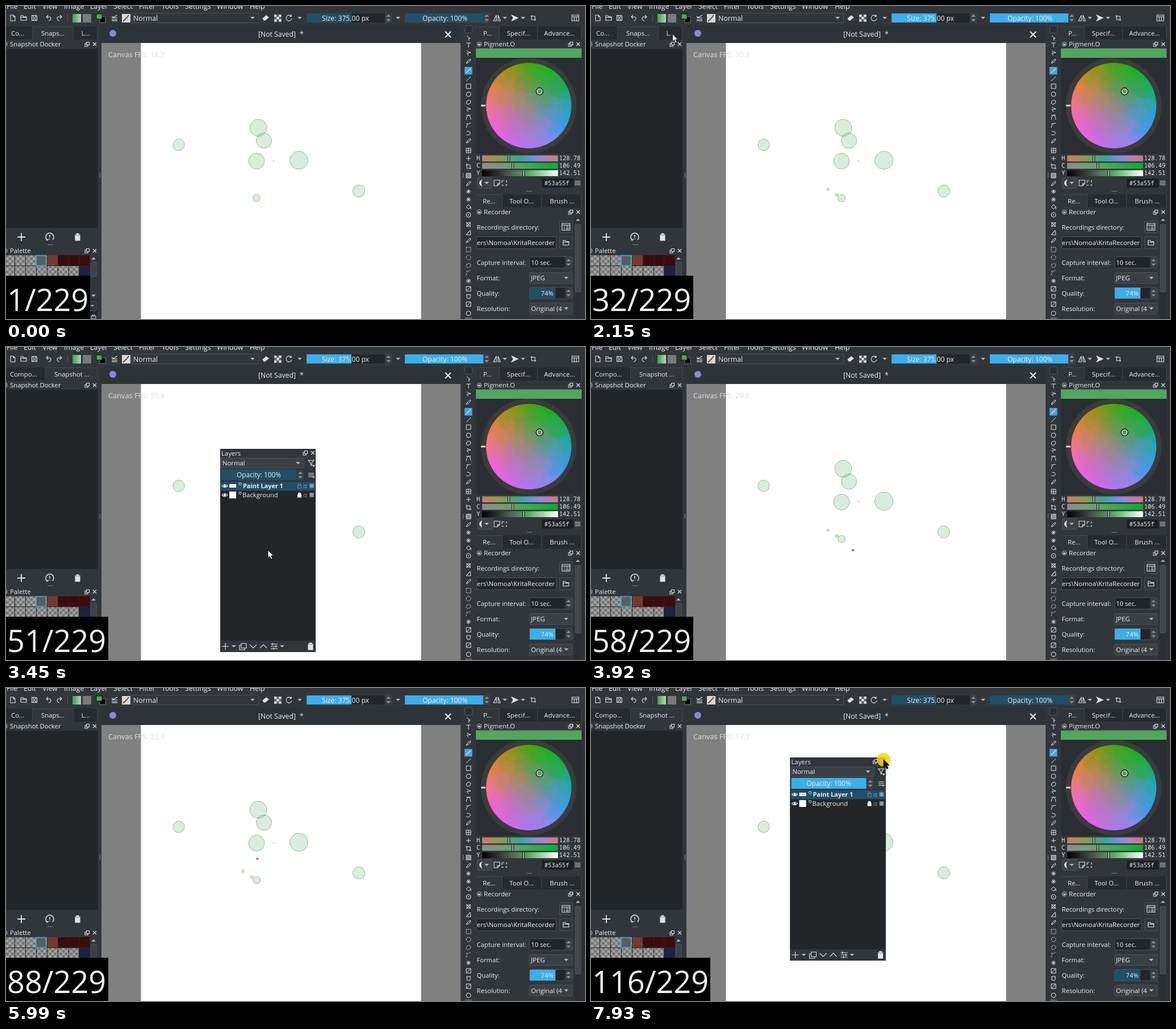
Recreate the animation shown at these times as an HTML page. Size 1019x550 px, loop 8 s.

```html
<!DOCTYPE html>
<html lang="en">
<head>
<meta charset="utf-8">
<title>Layers docker popup</title>
<style>
html, body { margin: 0; width: 100%; height: 100%; overflow: hidden; background: #31363b; }
svg { display: block; position: absolute; left: 0; top: 0; --main: #224e66; --panel: #224e66; }
text { font-family: "Open Sans", "Noto Sans", sans-serif; fill: #eff0f1; white-space: pre; }
.mono { font-family: "Noto Sans Mono", "DejaVu Sans Mono", monospace; }
.i { fill: none; stroke: #e3e5e7; stroke-width: 1.1; }
</style>
</head>
<body>
<svg id="stage" width="1019" height="550" viewBox="0 0 1019 550"></svg>
<script>
const FRAME = 68.75, LOOP = 8000, LAST = 115;
const BG = '#31363b', DARK = '#232629', EDGE = '#4d5257', ON = '#3daee9', OFF = '#224e66';

const rect = (x, y, w, h, fill, extra = '') => `<rect x="${x}" y="${y}" width="${w}" height="${h}" fill="${fill}" ${extra}/>`;
const box = (x, y, w, h, fill = BG) => rect(x + .5, y + .5, w - 1, h - 1, fill, `stroke="${EDGE}" rx="1.5"`);
const text = (x, y, s, size = 11.2, extra = '') => `<text x="${x}" y="${y}" font-size="${size}" ${extra}>${s}</text>`;
const mid = 'text-anchor="middle"';
const circ = (x, y, r, fill, extra = '') => `<circle cx="${x}" cy="${y}" r="${r}" fill="${fill}" ${extra}/>`;
const icon = (x, y, d, extra = '') => `<path class="i" transform="translate(${x} ${y})" d="${d}" ${extra}/>`;
const tri = (x, y, s = 4, c = '#b4b8bb') => `<path d="M${x - Math.abs(s)} ${y - s / 2}h${2 * Math.abs(s)}l${-Math.abs(s)} ${s}z" fill="${c}"/>`;
const spin = (x, y) => rect(x - 6, y - 9, 12, 18, '#3a4045') + tri(x, y - 4, -4, '#8d9296') + tri(x, y + 4, 4, '#8d9296');

const G = {
  plus: 'M-6 0H6M0-6V6',
  cross: 'M-3-3L3 3M3-3L-3 3',
  float: 'M-1.5-3.5H3.5V1.5H-1.5ZM-1.5-1H-4V4H1V1.5',
  trash: 'M-5-4H5M-2-4V-6H2V-4M-4-3V6H4V-3M-1.3-1V4M1.3-1V4',
  page: 'M-3.5-5H1L4-2V5H-4V-5ZM1-5V-2H4',
  folder: 'M-5-4H-1L0-2H5V4H-5ZM-5-1H5',
  save: 'M-4.5-4.5H3L4.5-3V4.5H-4.5ZM-2-4.5V-1H2V-4.5M-2 4.5V1.5H2V4.5',
  undo: 'M-1-5L-4-2L-1 1M-4-2H1Q4-2 4 1T0 5',
  redo: 'M1-5L4-2L1 1M4-2H-1Q-4-2-4 1T0 5',
  lines: 'M-5-3H5M-5 0H5M-5 3H5',
  reload: 'M4-3A5 5 0 1 0 5 1M4-6V-2.5H1',
  copy: 'M-3-5H6V3H-3ZM-3-2H-6V6H3V3',
  down: 'M-6-3L0 3L6-3', up: 'M-6 3L0-3L6 3',
  mixer: 'M-6-4H6M-6 0H6M-6 4H6M-3-6V-2M3-2V2M-1 2V6',
  funnel: 'M-5-5H5L1 0V4L-1 3V0ZM3 4L6 4L4.5 6Z',
  eye: 'M-5 0Q0-5 5 0Q0 5-5 0Z',
  lock: 'M-3-1H3V4H-3ZM-2-1V-3Q0-5 2-3V-1',
  sq: 'M-4-4H4V4H-4Z', ring: 'M-4 0A4 4 0 1 1 4 0A4 4 0 1 1-4 0',
  poly: 'M-3-2L1-4L4-2L3 2L-1 4L-4 2Z', pen: 'M-4 4L-2 0L3-4L4-2L0 2Z',
  curve: 'M-4 4Q-3-4 4-4M-4-3H0', tee: 'M-4-4H4M0-4V4', slash: 'M-4 4L4-4',
  angle: 'M-3-4L4-1L-3 0L0 4', frame: 'M-3-5V3H5M-5-3H3V5', star: 'M0-4V4M-4 0H4M-3-3L3 3M3-3L-3 3'
};
const SOLID = 'style="fill:#dfe1e3"';
const dockButtons = (x, y) => icon(x, y, G.float) + icon(x + 13, y, G.cross);
const chain = (x, y) => circ(x, y, 3.8, 'none', 'stroke="#bcc0c3"') + rect(x - 2, y - 1, 4, 3, '#bcc0c3');

let seed = 7;
const rnd = () => (seed = (seed * 16807) % 2147483647) / 2147483647;

// Rim colours every 30 degrees, clockwise from the top
const HUES = ['45a60f', '12b41c', '10ae5c', '1ca8c4', '389cf2', '8e86fa', 'b474f6', 'e062f2', 'f860dc', 'f8748c', 'e4823a', '9c9210']
  .map(h => [0, 2, 4].map(k => parseInt(h.substr(k, 2), 16)));
const mix = (a, b, f) => a.map((v, k) => v + (b[k] - v) * f);
function wheelColor(deg, f) {
  const p = ((deg + 360) % 360) / 30, k = Math.floor(p);
  const c = mix(HUES[k], HUES[(k + 1) % 12], p - k);
  return `rgb(${mix([143, 140, 132], c, f).map(Math.round)})`;
}
function wheel(cx, cy, R) {
  const at = (d, r) => {
    const a = d * Math.PI / 180;
    return [(cx + r * Math.sin(a)).toFixed(1), (cy - r * Math.cos(a)).toFixed(1)];
  };
  let s = circ(cx, cy, 84, '#3b3b3b');
  for (let d = 0; d < 360; d += 3)
    s += `<path d="M${cx} ${cy}L${at(d - .4, R)}L${at(d + 3.4, R)}Z" fill="${wheelColor(d, 1)}"/>`;
  s += circ(cx, cy, R, 'url(#grey)');
  for (let k = 0; k < 150; k++) {
    const d = rnd() * 360, r = R * .84 * Math.sqrt(rnd()), w = 5 + rnd() * 9, p = at(d, r).map(Number);
    const pts = [0, 1, 2, 3, 4].map(j => {
      const a = j * 1.257 + rnd();
      return `${(p[0] + w * Math.cos(a)).toFixed(1)},${(p[1] + w * Math.sin(a)).toFixed(1)}`;
    });
    s += `<polygon points="${pts.join(' ')}" fill="${wheelColor(d + rnd() * 24 - 12, r / R)}" opacity=".5"/>`;
  }
  return s + circ(939, 150, 5.5, 'none', 'stroke="#111" stroke-width="2.4"') +
    circ(939, 150, 4.6, 'none', 'stroke="#fff" stroke-width="1.3"') + rect(836, 173.5, 8, 3, '#d5d5d5');
}

const grad = (id, cols) => `<linearGradient id="${id}">${cols.map((c, k) =>
  `<stop offset="${k / (cols.length - 1)}" stop-color="${c}"/>`).join('')}</linearGradient>`;
const defs = `<defs>
${grad('gh', ['#c0806f', '#b0895a', '#8a9c52', '#53a56a', '#3fa39a', '#5d98cc', '#9688dc', '#c07ab4', '#c87a7c'])}
${grad('gc', ['#8c8c8c', '#7d987f', '#53a55f', '#2aac48', '#00b22c'])}
${grad('gy', ['#000', '#2b2f2c', '#53685a', '#53a55f', '#a4d8ab', '#fff'])}
${grad('gs', ['#3f9a4d', '#b8d8bb'])}
<radialGradient id="grey"><stop offset="0" stop-color="#8f8c84"/><stop offset="1" stop-color="#8f8c84" stop-opacity="0"/></radialGradient>
<pattern id="chk" width="9.4" height="9.3" patternUnits="userSpaceOnUse">
${rect(0, 0, 9.4, 9.3, '#a3a3a3') + rect(0, 0, 4.7, 4.65, '#727272') + rect(4.7, 4.65, 4.7, 4.65, '#727272')}</pattern>
<clipPath id="path"><rect x="829" y="405" width="138" height="22"/></clipPath></defs>`;

function tabs(list, y, h) {
  return list.map(([x, w, s, active, tx]) =>
    rect(x, y, w, h, active ? BG : '#272b2f') + rect(x + w - 1, y, 1, h, '#41464b') +
    (active ? rect(x, y, w, 1, '#454a4f') : '') + text(tx, y + 16, s, 11.4)).join('');
}

function toolbar() {
  const menu = [[1, 'File'], [31, 'Edit'], [64, 'View'], [102, 'Image'], [148, 'Layer'], [189, 'Select'],
    [234, 'Filter'], [274, 'Tools'], [315, 'Settings'], [371, 'Window'], [429, 'Help']];
  const squares = [0, 1, 2, 3, 4, 5, 6, 7, 8].filter(k => k % 2 < 1)
    .map(k => rect(472 + (k % 3) * 4.2, 15 + Math.floor(k / 3) * 4.2, 4.2, 4.2, '#e6e8ea')).join('');
  return menu.map(([x, s]) => text(x, 4.5, s, 12.3)).join('') +
    icon(12, 21, G.page) + icon(31, 21, G.folder) + icon(50, 21, G.save) + icon(75, 21, G.undo) + icon(94, 21, G.redo) +
    rect(108, 15, 1, 13, '#555a5f') + rect(117, 14, 15, 15, 'url(#gs)') + rect(135, 14, 15, 15, '#7a7a7a') +
    rect(165, 19, 10, 10, '#000', 'stroke="#777"') + rect(159, 14, 10, 9, '#53a55f', 'stroke="#111"') +
    icon(191, 21, 'M-5-3L-2-1L5-5M-5 0H5M-5 3H5M-5 5H5') + rect(204, 14, 15, 15, '#d9d9d9') +
    icon(211, 21, 'M-5 6L1 0L5-5', 'style="stroke:#665040;stroke-width:2"') +
    box(221, 12, 224, 18) + text(224, 25.5, 'Normal', 12.3) + tri(434, 21) +
    icon(457, 21, 'M-5 1L1-4L5-1L-1 4H-3Z', SOLID) + rect(472, 15, 12.6, 12.6, '#5a5f63') + squares +
    icon(498, 21, G.reload) + tri(517, 21) +
    rect(529, 13, 138, 16, DARK) + rect(529, 13, 79, 16, 'var(--main)') +
    text(556, 25.5, 'Size: 375.00 px', 12.1) + spin(673, 21) + tri(690, 21) +
    rect(702, 13, 138, 16, 'var(--main)') + text(733, 25.5, 'Opacity: 100%', 12) + spin(846, 21) +
    icon(864, 21, 'M-1-5V5H-6ZM2-5V5H6Z') + tri(878, 21) + icon(895, 21, 'M-5-5L6 0L-5 5L-2 0Z', SOLID) + tri(910, 21) +
    icon(928, 21, G.frame) + icon(1002, 21, 'M-6-5H6V5H-6ZM-6-2H6M2-2V5M-2-2V5');
}

function leftDock() {
  let s = rect(0, 34, 168, 516, BG) + '<g id="tabs"></g>' +
    circ(-2, 67, 4, 'none', 'stroke="#bcc0c3"') + text(7, 71, 'Snapshot Docker', 11.3) + dockButtons(143, 67) +
    rect(0, 75, 161, 315, DARK) +
    icon(27, 406, 'M-7 0H7M0-7V7', 'style="stroke-width:1.8"') + icon(126, 406, G.trash, SOLID) +
    icon(77, 406, 'M-5 5A7 7 0 1 1 5 5M-7 2L-5 5.5L-2 4M0-4V1M0 3V4', 'style="stroke-width:1.5"') +
    rect(73, 419, 10, 1, '#777c80') + circ(-2, 430, 4, 'none', 'stroke="#bcc0c3"') + text(7, 434, 'Palette', 11.3) + dockButtons(143, 430) +
    rect(0, 438, 161, 112, DARK) + rect(0, 438, 72, 37, 'url(#chk)') + rect(72, 456, 56, 19, 'url(#chk)') +
    rect(72, 438, 19, 18, '#733a30') + rect(91, 438, 56, 18, '#3b0b0d') + rect(128, 457, 19, 18, '#1d2141') +
    [15, 34, 53, 72, 91, 110, 128].map(x => rect(x, 438, 1, 37, '#26292c')).join('') + rect(0, 456, 147, 1, '#26292c') +
    rect(53, 438.5, 17.5, 17.5, '#5c5c5a', `stroke="${ON}" stroke-width="1.6"`);
  return s + rect(148, 438, 13, 78, BG) + box(149, 450, 11, 26, '#3b4146') + tri(154, 443.5, -4) + tri(154, 509, 4) +
    box(140, 518, 20, 18) + tri(152, 527, 3) + icon(154, 549, G.trash) + rect(165, 293, 1, 9, '#80858a');
}

function canvasView() {
  const dots = [[441, 337.5, 6.5], [444, 214, 15], [454, 236.5, 13.5], [441, 272.5, 14], [515.5, 271, 16], [304, 244, 10.2], [621, 325, 10.7]];
  const dab = (x, y, r) => circ(x, y, r, '#53a55f', 'fill-opacity=".21" stroke="#3f8f4c" stroke-opacity=".5"');
  return rect(168, 34, 632, 31, '#2e3338') + circ(188, 48, 6, '#8d86d6') + text(444, 53.5, '[Not Saved]', 12.2) + text(517, 53.5, '*', 12.2) +
    icon(778, 50, 'M-5-5L5 5M5-5L-5 5', 'style="stroke-width:2.2"') +
    rect(168, 65, 632, 485, '#808080') + rect(237.5, 65, 493, 485, '#fff') +
    circ(417, 322, 3, '#c9e0cc', 'id="dabA"') + circ(432.5, 332, 3.5, '#c9e0cc', 'id="dabB"') +
    dots.map(d => dab(...d)).join('') + circ(471, 272, 1.8, '#d6dbd6') +
    text(180, 89.5, '', 12.8, 'id="fps" style="fill:#dedede"');
}

function toolbox() {
  const list = [[56, 'M-3-4L3 1L0 1L1 5'], [69, G.tee], [83, G.angle], [97, G.pen], [128, G.slash], [141, G.sq], [155, G.ring], [169, G.poly],
    [182, G.angle], [196, 'M-4 4Q-3-4 0-4T4 4M-4-4H4'], [210, G.curve], [223, 'M-3-3Q4-3 3 1T-4 3'], [237, G.pen], [254, 'M-4-4H4V4H-4ZM0-4V4M-4 0H4'],
    [268, G.plus.replace(/6/g, '4')], [282, G.frame], [312, G.pen], [326, G.star], [340, G.star], [353, 'M-4 0L0-4L4 0L0 4ZM4 0V4'],
    [367, G.ring + 'M-1 0H1M0-1V1'], [384, 'M-4-4L4 4M4-4L-4 4M-3-3H3V3H-3Z'], [398, 'M-4 4H4L3-4ZM-4 4L3-4'], [412, G.pen],
    [428, G.sq], [442, G.ring], [456, G.poly], [469, G.curve], [483, G.star], [497, G.sq + G.slash], [510, 'M-4-3H4M-3-3V3Q0 5 3 3V-3'], [524, G.sq + G.slash], [540, G.ring]];
  return rect(800, 34, 27, 516, BG) + box(807, 34, 14, 14, '#2a2e32') + rect(807, 107, 13.5, 13.5, '#4aa3dc') + icon(814, 113.5, 'M-4 4L-1 1L4-4') +
    list.map(([y, d], k) => icon(814, y, d, `style="stroke-width:1" ${k > 23 && k < 28 ? 'stroke-dasharray="2 1.3"' : ''}`)).join('') +
    rect(810, 294, 8, 8, '#8b8b8b', 'stroke="#ddd"') + rect(804, 293, 1, 9, '#80858a') + rect(808, 547, 12, 3, '#5a5f64');
}

function rightDock() {
  const bars = [['H', 262.5, 'gh', 885, '128.78'], ['C', 275.5, 'gc', 892, '106.49'], ['Y', 288.5, 'gy', 911, '142.51']];
  const label = (y, s) => text(828.5, y, s, 11.2);
  const combo = (y, s) => box(921, y, 76, 20, '#3a4045') + text(924, y + 14, s, 11.4) + tri(986, y + 10);
  return rect(827, 34, 192, 516, BG) +
    tabs([[828, 41, 'P...', 1, 840], [869, 67, 'Specif...', 0, 881.5], [936, 77, 'Advance...', 0, 947]], 36, 23) +
    chain(833, 67) + text(841, 71, 'Pigment.O', 11.3) + dockButtons(994, 67) +
    rect(827, 75, 186, 185, '#2a2e32') + rect(827, 74.5, 186, 16.5, '#53a55f') + wheel(920, 175, 75) +
    bars.map(([n, y, id, m, v]) => text(828, y + 8.7, n, 10.4, 'class="mono"') + rect(838, y, 133.5, 10.5, `url(#${id})`) +
      rect(m - 2, y, 4, 10.5, '#111') + rect(m - .7, y, 1.4, 10.5, '#fff') + text(973.5, y + 8.7, v, 10.4, 'class="mono"')).join('') +
    box(829, 301, 27, 20, '#3d4247') + icon(836, 311, 'M1-5Q-6 0 1 5Q-1 0 1-5Z', SOLID) + tri(846, 311) +
    icon(864, 311, 'M-5-5H5V1L1 5H-5ZM5 1H1V5') + icon(877, 311, G.sq, 'stroke-dasharray="4 3"') +
    rect(943, 303, 56, 16, '#1d2023') + text(947.5, 314.5, '#53a55f', 10.4, 'class="mono"') + icon(1006, 311, G.lines) + rect(916, 325, 10, 1, '#777c80') +
    tabs([[828, 46, 'Re...', 1, 839], [874, 69, 'Tool O...', 0, 886], [943, 70, 'Brush ...', 0, 957]], 331, 23) +
    chain(833, 362) + text(841, 366, 'Recorder', 11.3) + dockButtons(994, 362) +
    label(393, 'Recordings directory:') + box(974, 377, 23, 22) + icon(985.5, 388, 'M-7-6H7V6H-7ZM-7-3H7M-4-1H-2M-4 2H-2M-4 4H-2M0-1H5M0 2H5M0 4H5') +
    box(828, 405, 141, 22, DARK) + `<g clip-path="url(#path)">${text(966, 420, 'Users\\Nomoa\\KritaRecorder', 11.4, 'text-anchor="end"')}</g>` +
    box(974, 405, 23, 22) + icon(985.5, 416, G.folder) +
    label(455, 'Capture interval:') + box(921, 440, 76, 21, DARK) + text(924, 455, '10 sec.', 11.2) + spin(990, 450.5) +
    label(482, 'Format:') + combo(468, 'JPEG') +
    label(509, 'Quality:') + box(921, 494, 76, 21, DARK) + rect(922, 495, 45, 19, 'var(--main)') + text(952.5, 509, '74%', 11.4, mid) + spin(990, 504.5) +
    label(536, 'Resolution:') + combo(521.5, 'Original (4') +
    rect(1000, 370, 13, 180, '#2b2f33') + tri(1006.5, 375.5, -4) + box(1001, 383, 11, 120, '#42474c') +
    rect(1014, 58, 5, 492, '#2b3034');
}

function layersPanel() {
  const row = (y, s, bold, x) => icon(8, y, G.eye) + circ(8, y, 2, '#fff') +
    (bold ? rect(16, y - 3, 12, 6, '#fff') + [17, 21, 25].map(k => rect(k, y - 1, 2, 2, '#bbb')).join('') : rect(16, y - 6, 12, 12, '#fff')) +
    icon(35, y - 3, 'M-2-2H2V1M-2-2Q-3 2 2 2', 'style="stroke-width:.9"') + text(x, y + 4, s, bold ? 10.9 : 11.2, bold ? 'font-weight="700"' : '') +
    icon(139.5, y, G.lock, bold ? 'opacity=".4"' : 'style="fill:#fff"') + text(146, y + 3.5, 'α', 11, 'opacity=".5"') +
    rect(157, y - 4, 8, 8, '#6c7175') + icon(161, y, G.star, 'opacity=".4"');
  return rect(0, 0, 168, 357, BG) + text(2, 12, 'Layers', 11.3) + dockButtons(150, 7) +
    box(1, 16, 147, 18, '#3a4045') + text(4, 29, 'Normal', 11.3) + tri(137, 25) + icon(160, 25, G.funnel) +
    rect(2, 36, 132, 19, 'var(--panel)') + text(68, 50, 'Opacity: 100%', 11.8, mid) + spin(141, 46) +
    icon(160, 46, G.lines) + tri(164, 50, 3) + rect(0, 57, 168, 280, DARK) + rect(0, 57.5, 168, 16, OFF) +
    row(65, 'Paint Layer 1', true, 40) + row(81, 'Background', false, 39) +
    icon(9, 347, G.plus) + tri(24, 347) + icon(40, 347, G.copy) + icon(58, 347, G.down) + icon(76, 347, G.up) +
    icon(95, 347, G.mixer) + tri(109, 347) + icon(159, 347, G.trash, SOLID) +
    rect(.5, .5, 167, 356, 'none', 'stroke="#25292c"');
}

const stage = document.getElementById('stage');
stage.innerHTML = defs + rect(0, 0, 1019, 550, BG) + toolbar() + leftDock() + canvasView() + toolbox() + rightDock() +
  `<g id="layers">${layersPanel()}</g>` +
  '<g id="ring"><circle r="8.5" fill="none" stroke="#222" stroke-dasharray="5 1"/></g>' +
  '<g id="dot"><circle r="1.5" fill="#fff" stroke="#222"/></g>' +
  circ(0, 0, 12, '#f2d60a', 'id="click" opacity=".85"') +
  '<path id="arrow" d="M0 0V13.5L3.2 10.7L5.5 16L8 15L5.7 9.8H10Z" fill="#fff" stroke="#111"/>' +
  rect(0, 474, 148, 76, '#000', 'id="plate"') + text(2, 536, '', 54, 'id="count"');

const el = id => document.getElementById(id);
const show = (id, on) => el(id).setAttribute('visibility', on ? 'visible' : 'hidden');
const move = (id, p) => el(id).setAttribute('transform', `translate(${p[0]} ${p[1]})`);

// Pointer path: time, x, y
const PATH = [[280, 620, 570], [760, 430, 325], [860, 417, 322], [1000, 417, 322], [1173, 440, 312], [1242, 453, 317], [1380, 432.5, 332], [1450, 432.5, 332],
  [1560, 470, 160], [1670, 425, 8], [1740, 360, 25], [1960, 140, 48], [2280, 146, 50], [2490, 425, 310], [2580, 461, 357], [3940, 461, 357],
  [4130, 330, 220], [4300, 140, 48], [4700, 140, 48], [4950, 380, 270], [5080, 425.5, 299.5], [5120, 425.5, 299.5], [5200, 442.5, 300],
  [6020, 442.5, 300], [6130, 434, 300], [6700, 434, 300], [7150, 526, 112], [7500, 520, 124], [7750, 515, 126]];
function cursorAt(t) {
  const k = PATH.findIndex(p => p[0] > t);
  if (k === 0) return PATH[0].slice(1);
  if (k < 0) return PATH[PATH.length - 1].slice(1);
  const [t0, x0, y0] = PATH[k - 1], [t1, x1, y1] = PATH[k], f = (t - t0) / (t1 - t0);
  return [x0 + (x1 - x0) * f, y0 + (y1 - y0) * f];
}
const steps = (list, t) => list.filter(s => s[0] <= t).pop()[1];
const within = (t, a, b) => t >= a && t < b;
const FPS = [[0, 18.7], [830, 30.3], [2480, 55.8], [3720, 20.6], [5500, 22.1], [6550, 17.7]];
const NARROW = tabs([[0, 47, 'Co...', 0, 9], [47, 72, 'Snaps...', 1, 62], [119, 42, 'L...', 0, 132.5]], 36, 23);
const WIDE = tabs([[0, 70, 'Compo...', 0, 7], [70, 91, 'Snapshot ...', 1, 85]], 36, 23);
let tabState;

function draw(ms) {
  const n = Math.min(LAST, Math.floor(ms / FRAME)), t = n * 69;
  const first = within(t, 2610, 3770), second = within(t, 5290, 5900), third = t >= 6330;
  const open = first || second || third, clicked = t >= 7780;
  const wide = within(t, 2610, 4260) || second || third;
  if (wide !== tabState) el('tabs').innerHTML = (tabState = wide) ? WIDE : NARROW;

  stage.style.setProperty('--main', t < 200 || clicked ? OFF : ON);
  stage.style.setProperty('--panel', clicked ? ON : OFF);
  el('fps').textContent = 'Canvas FPS: ' + steps(FPS, t).toFixed(1);
  show('dabA', t >= 890);
  el('dabA').setAttribute('fill', t < 1400 ? '#dadcda' : '#c9e0cc');
  show('dabB', t >= 1400);

  show('layers', open);
  move('layers', first ? [377, 179] : second ? [358.5, 122] : [350.5, 122]);

  const p = cursorAt(t), onCanvas = p[0] > 168 && p[1] > 65 && !open, active = t >= 280;
  const still = within(t, 3770, 3960) || within(t, 5900, 6030);
  show('ring', active && onCanvas && !still);
  show('dot', active && onCanvas);
  show('arrow', active && !onCanvas);
  show('click', clicked);
  move('ring', p);
  move('dot', cursorAt(t - 69));
  move('arrow', p);
  move('click', p);
  el('arrow').setAttribute('fill', clicked ? '#111' : '#fff');

  el('plate').setAttribute('width', n < 9 ? 148 : n < 99 ? 180 : 210);
  el('count').textContent = (n + 1) + '/229';
}

const start = performance.now();
function tick() {
  draw((performance.now() - start) % LOOP);
  requestAnimationFrame(tick);
}
tick();
</script>
</body>
</html>
```
